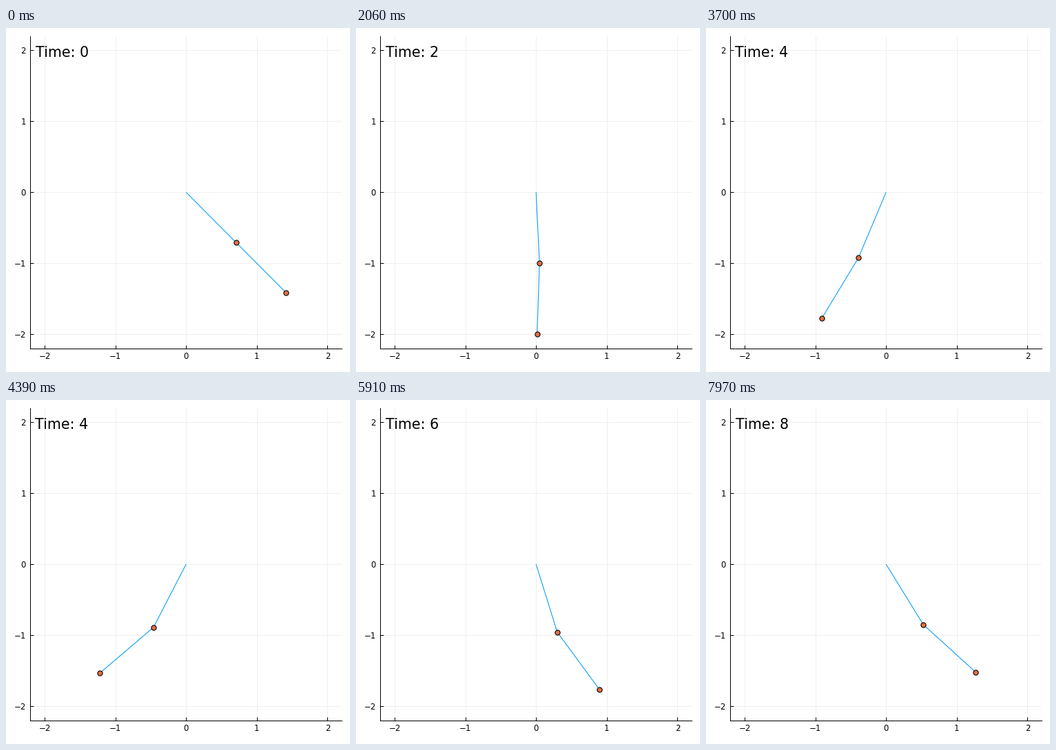
Recreate the animation shown at these times as a matplotlib script. Size 499 px wide and 499 px high, loop 8 s.

```python
import numpy as np
import matplotlib.pyplot as plt
from matplotlib.animation import FuncAnimation

SIZE = 499          # stage, px
DPI = 100
LOOP_MS = 8000
TICK_MS = 20        # redraw interval
POSES = 264         # distinct poses in one loop
DT = 0.03           # simulated seconds per pose
SUBSTEPS = 12
G = 9.835
LIMIT = 2.2


def pt(px):
    return px * 72 / DPI


def slope(state):
    """Double pendulum with unit masses and unit rods."""
    a, b, va, vb = state
    d = a - b
    s, c = np.sin(d), np.cos(d)
    fa = -vb**2 * s - 2 * G * np.sin(a)
    fb = va**2 * s - G * np.sin(b)
    det = 2 - c * c
    return np.array([va, vb, (fa - c * fb) / det, (2 * fb - c * fa) / det])


def rk4(state, h):
    k1 = slope(state)
    k2 = slope(state + h / 2 * k1)
    k3 = slope(state + h / 2 * k2)
    k4 = slope(state + h * k3)
    return state + h / 6 * (k1 + 2 * k2 + 2 * k3 + k4)


def simulate():
    state = np.array([np.pi / 4, np.pi / 4, 0.0, 0.0])
    angles = [state[:2]]
    for _ in range(POSES - 1):
        for _ in range(SUBSTEPS):
            state = rk4(state, DT / SUBSTEPS)
        angles.append(state[:2])
    return np.array(angles)


angles = simulate()
xs = np.cumsum(np.sin(angles), axis=1)
ys = np.cumsum(-np.cos(angles), axis=1)

plt.rcParams["font.family"] = "DejaVu Sans"
fig = plt.figure(figsize=(SIZE / DPI, SIZE / DPI), dpi=DPI, facecolor="white")
ax = fig.add_axes([35.45 / SIZE, 34 / SIZE, 451.5 / SIZE, 453.5 / SIZE])
ax.set(xlim=(-LIMIT, LIMIT), ylim=(-LIMIT, LIMIT),
       xticks=range(-2, 3), yticks=range(-2, 3))
ax.set_axisbelow(True)
ax.grid(color="black", alpha=0.1, linewidth=pt(0.6))
ax.spines[["top", "right"]].set_visible(False)
ax.spines[["left", "bottom"]].set_linewidth(pt(1))
ax.tick_params(direction="in", length=pt(5), width=pt(1), labelsize=pt(11.8))
ax.tick_params(axis="x", pad=pt(5.5))
ax.tick_params(axis="y", pad=pt(6.5))

rods, = ax.plot([], [], color="#009AFA", linewidth=pt(1.05), zorder=3,
                solid_capstyle="butt", solid_joinstyle="miter")
bobs, = ax.plot([], [], "o", markersize=pt(7.2), markerfacecolor="#E26F46",
                markeredgecolor="black", markeredgewidth=pt(1.1), zorder=4)
label = ax.text(-1.755, 1.905, "", fontsize=pt(20.7), ha="center",
                va="baseline", zorder=5)


def update(i):
    # pose starts are rounded to 10 ms; show the latest one within this tick
    k = int((i * TICK_MS + 15) * POSES / LOOP_MS)
    rods.set_data([0, *xs[k]], [0, *ys[k]])
    bobs.set_data(xs[k], ys[k])
    label.set_text(f"Time: {round(k * DT)}")
    return rods, bobs, label


anim = FuncAnimation(fig, update, frames=LOOP_MS // TICK_MS, interval=TICK_MS,
                     repeat=True, repeat_delay=0)
plt.show()
```
